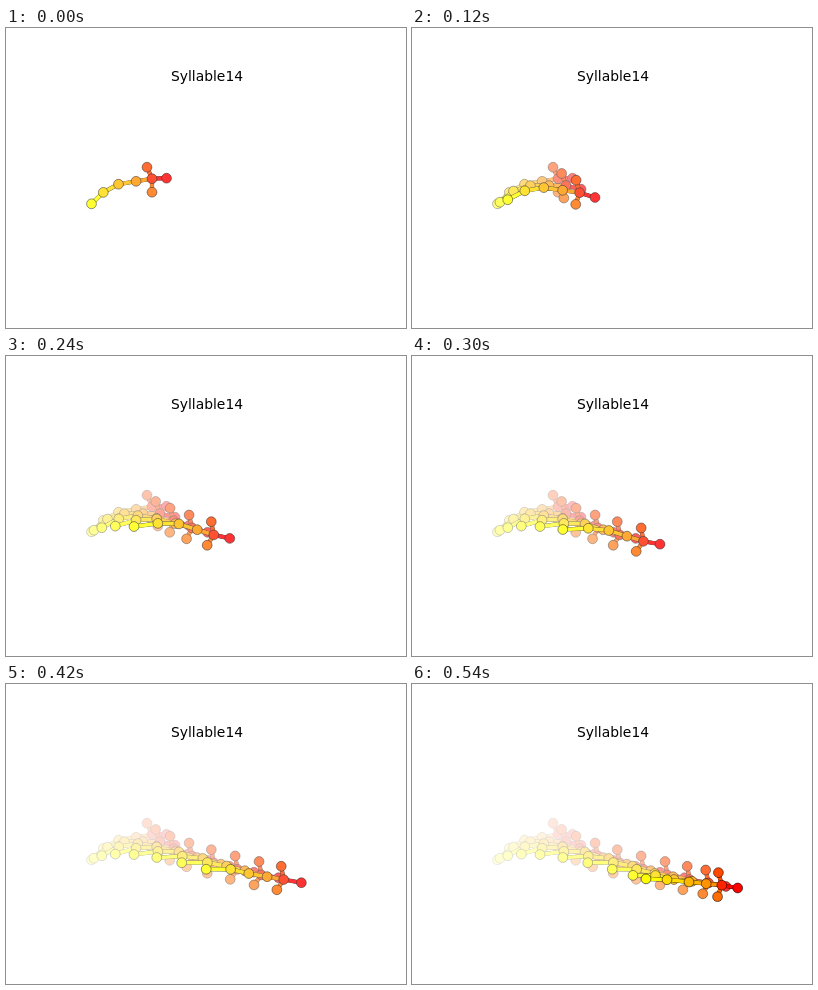
Animation, 400 px wide and 300 px high, one loop 0.6 s. Source, as an HTML page with a canvas:

```html
<!DOCTYPE html>
<html lang="en">
<head>
<meta charset="utf-8">
<title>Syllable14</title>
<style>
  html, body { margin: 0; width: 100%; height: 100%; overflow: hidden; background: #fff; }
  canvas { position: absolute; left: 0; top: 0; width: 400px; height: 300px; }
  h1 {
    position: absolute; left: 0; top: 40px; width: 402px; margin: 0;
    font: 13.89px/16px "DejaVu Sans", sans-serif; text-align: center; color: #000;
  }
</style>
</head>
<body>
<canvas id="stage" width="400" height="300"></canvas>
<h1>Syllable14</h1>
<script>
const STEP = 60, STEPS = 10, RADIUS = 4.9;
const ctx = document.getElementById('stage').getContext('2d');

// Key points of the spine; a smooth curve runs through them.
const KEY_STEPS = [0, 2, 5, 8, 9];
const paths = {
  nose: [[160.5, 150.2], [183, 169.5], [248, 188.2], [314, 202.5], [325.7, 204]],
  neck: [[146, 150.7], [167.6, 164.7], [231.4, 185.3], [296.5, 199], [309.8, 201.2]],
  back: [[112.5, 156.2], [131.8, 159.6], [196.8, 174.5], [262, 195.5], [277, 198]],
  hip: [[97.3, 164.4], [112.8, 162.8], [176.3, 172.3], [243.5, 191.5], [255, 195.7]],
  tail: [[85.5, 175.8], [95.8, 171.7], [150.8, 173.5], [221, 191.4], [234, 194.9]]
};

// Listed from red to yellow.
const joints = ['nose', 'neck', 'leftEar', 'rightEar', 'chest', 'back', 'hip', 'tail'];
const color = {};
joints.forEach((name, i) => {
  color[name] = `rgb(255,${Math.round(255 * i / (joints.length - 1))},0)`;
});

// The first joint of each pair gives the color.
const bones = [
  ['tail', 'hip'], ['hip', 'back'], ['back', 'chest'], ['chest', 'neck'],
  ['rightEar', 'neck'], ['leftEar', 'neck'], ['nose', 'neck']
];

// Lagrange interpolation through the key points.
function along(path, step) {
  const point = [0, 0];
  KEY_STEPS.forEach((key, i) => {
    const weight = KEY_STEPS.reduce(
      (w, other) => other === key ? w : w * (step - other) / (key - other), 1);
    point[0] += weight * path[i][0];
    point[1] += weight * path[i][1];
  });
  return point;
}

const shift = ([x, y], dx, dy) => [x + dx, y + dy];
const mix = (a, b, f) => a.map((v, i) => v + (b[i] - v) * f);

function poseAt(step) {
  const pose = {};
  for (const name in paths) pose[name] = along(paths[name], step);
  const sway = Math.sin(0.28 * step);
  pose.chest = mix(pose.back, pose.neck, 0.525);
  pose.leftEar = shift(pose.neck, 2.8 * sway - 5, -11.5 - 1.9 * sway);
  pose.rightEar = shift(pose.neck, -7.3 * sway, 13.5 - 3.5 * sway);
  return pose;
}

function drawBones(pose, width, paint) {
  ctx.lineWidth = width;
  for (const [a, b] of bones) {
    ctx.strokeStyle = paint(a);
    ctx.beginPath();
    ctx.moveTo(...pose[a]);
    ctx.lineTo(...pose[b]);
    ctx.stroke();
  }
}

function drawPose(pose) {
  drawBones(pose, 4.17, () => '#000');
  drawBones(pose, 3.75, name => color[name]);
  ctx.lineWidth = 0.55;
  ctx.strokeStyle = '#000';
  for (const name of joints) {
    ctx.fillStyle = color[name];
    ctx.beginPath();
    ctx.arc(...pose[name], RADIUS, 0, 2 * Math.PI);
    ctx.fill();
    ctx.stroke();
  }
}

function veil(alpha) {
  ctx.fillStyle = `rgba(255,255,255,${alpha})`;
  ctx.fillRect(0, 0, 400, 300);
}

// Every pose but the final one is washed with white after drawing.
function draw(last) {
  veil(1);
  for (let step = 0; step <= last; step++) {
    drawPose(poseAt(step));
    if (step < STEPS - 1) veil(0.2);
  }
}

let shown = -1;
function tick() {
  const step = Math.floor(performance.now() / STEP) % STEPS;
  if (step !== shown) draw(shown = step);
  requestAnimationFrame(tick);
}
tick();
</script>
</body>
</html>
```
